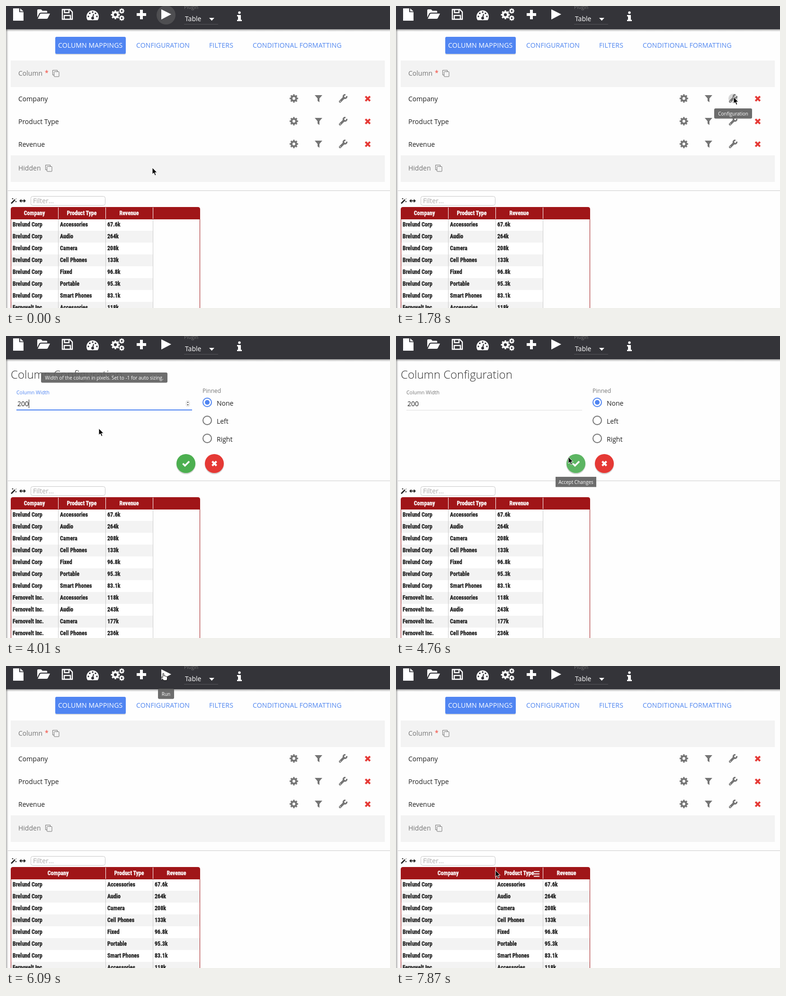
Write an HTML page that moves like this. It is 811 px wide and 637 px high and loops after 8000 ms.

```html
<!DOCTYPE html>
<html lang="en">
<head>
<meta charset="utf-8">
<title>Column width</title>
<style>
html, body { margin: 0; width: 100%; height: 100%; overflow: hidden; background: #fefefe; }
svg { display: block; width: 811px; height: 637px; }
text { font: 14px "Open Sans", sans-serif; fill: #212121; white-space: pre; }
.grey { fill: #757575; }
.white { fill: #fff; }
.star { fill: #f44336; }
.tab { letter-spacing: .01em; fill: #4f86f0; }
.tab.on { fill: #fff; }
.title { font-size: 24px; font-weight: 300; fill: #333; }
.label { font-size: 10.5px; fill: #757575; }
.label.active { fill: #5085f2; }
.pinned { font-size: 12px; fill: #757575; }
.hint { fill: #aaa; }
.tip { font-size: 10px; fill: #fff; text-anchor: middle; }
.cell, .head { font: 900 12px "Roboto Condensed", "Open Sans Condensed", Roboto, sans-serif;
  font-stretch: 75%; stroke: #212121; stroke-width: .3; }
.head { fill: #fff; stroke: #fff; text-anchor: middle; }
</style>
</head>
<body>
<svg id="stage" viewBox="0 0 811 637"></svg>
<script>
const BLUE = '#5085f2', RED = '#e53935', GREY = '#757575', MAROON = '#a01518';

const text = (x, y, s, cls = '', rest = '') => `<text x="${x}" y="${y}" class="${cls}" ${rest}>${s}</text>`;
const rect = (x, y, w, h, fill, rest = '') => `<rect x="${x}" y="${y}" width="${w}" height="${h}" fill="${fill}" ${rest}/>`;
const circle = (x, y, r, fill, rest = '') => `<circle cx="${x}" cy="${y}" r="${r}" fill="${fill}" ${rest}/>`;
const path = (d, fill, rest = '') => `<path d="${d}" fill="${fill}" ${rest}/>`;
const line = (d, color, width = 1, rest = '') => path(d, 'none', `stroke="${color}" stroke-width="${width}" ${rest}`);
const group = (id, ...parts) => `<g id="${id}">${parts.join('')}</g>`;

const tip = (id, x, y, w, label, r = 3) => group(id,
  rect(x, y, w, 21.5, '#616161', `rx="${r}" opacity=".92"`), text(x + w / 2, y + 14.5, label, 'tip'));

const gear = (x, y, r, color) =>
  circle(x, y, r * .56, 'none', `stroke="${color}" stroke-width="${r * .46}"`) +
  circle(x, y, r * .86, 'none', `stroke="${color}" stroke-width="${r * .28}" pathLength="16" stroke-dasharray="1" stroke-dashoffset=".5"`);

const copyIcon = (x, y) =>
  line(`M${x + 3.5} ${y + 10.5}h-3v-10h10v3`, GREY) +
  rect(x + 3.5, y + 3.5, 10.5, 10.5, 'none', `stroke="${GREY}" rx="1"`);

const cross = (x, y, r, color, width) =>
  line(`M${x - r} ${y - r}l${2 * r} ${2 * r}m0 ${-2 * r}l${-2 * r} ${2 * r}`, color, width);

const header = () => [
  rect(0, 49, 5, 588, 'url(#side)'),
  rect(0, 49, 811, 5, 'url(#drop)'),
  rect(0, 0, 811, 49, '#343439'),
  path('M15 5H28V13H37V31H15ZM30 5L37 11.5H30Z', '#fff'),
  path('M66 24V9Q66 7 68 7H74L77 10H85Q87 10 87 12V14H74Q71 14 70 16ZM67 27L72 17Q73 16 74 16H93L88 26Q87 27 86 27Z', '#fff'),
  line('M119 7.5H135L140 12.5V28H119ZM123.5 7.5V14H133V7.5M123 28V20H136V28', '#fff', 2.4),
  path('M172.5 30A13 13 0 1 1 193.5 30Z', '#fff'),
  ...[[174, 22], [177, 15.5], [183, 13], [189, 15.5], [192, 22]].map(([x, y]) => circle(x, y, 1.7, '#343439')),
  line('M183 25L185 17', '#343439', 2), circle(183, 25.5, 3, '#343439'),
  gear(231, 18.5, 9.5, '#fff'), gear(244.5, 10.5, 5.8, '#fff'), gear(244.5, 25.5, 5.8, '#fff'),
  line('M276 18H296M286 8V28', '#fff', 6),
  group('runFocus', circle(338, 19, 20, '#4e4e51')),
  path('M328 7L349 17.5L328 28.5Z', '#fff'),
  text(376, 6, 'Plugin', 'label'), text(378, 32, 'Table', 'white'),
  path('M429 25H440L434.5 31Z', '#fff'), line('M376 38.5H448', '#56565a'),
  circle(493, 14, 2.7, '#fff'), path('M488 19H496V29H498V32H488V29H490V22H488Z', '#fff')
].join('');

const mappingRow = (label, y) => [
  text(26, y + 6, label), gear(608, y, 9, GREY),
  path(`M652 ${y - 7}h16l-6 7v8l-4 -3v-5z`, GREY),
  line(`M705.5 ${y + 6.5}L713.5 ${y - 1.5}`, GREY, 4.8, 'stroke-linecap="round"'),
  line(`M716.9 ${y - 7.5}A3.6 3.6 0 1 0 719.5 ${y - 4.9}`, GREY, 3.2),
  circle(706, y + 6, .9, '#fff'),
  cross(764, y + .5, 4.8, RED, 4)
].join('');

const mappings = () => group('mappings',
  rect(104, 66, 149, 37, '#000', 'rx="3" opacity=".12"'),
  rect(104, 65, 149, 36, BLUE, 'rx="3"'),
  text(110, 88, 'COLUMN MAPPINGS', 'tab on'), text(275, 88, 'CONFIGURATION', 'tab'),
  text(429, 88, 'FILTERS', 'tab'), text(521, 88, 'CONDITIONAL FORMATTING', 'tab'),
  rect(10, 115, 790, 56, '#f3f3f3'), rect(10, 315, 790, 56, '#f3f3f3'),
  text(26, 147, 'Column', 'grey'), text(82, 146, '*', 'star'), copyIcon(98, 135),
  text(26, 347, 'Hidden', 'grey'), copyIcon(83, 335),
  group('wrenchHover', circle(712, 195, 10, '#d8d8d8')),
  ...['Company', 'Product Type', 'Revenue'].map((s, i) => mappingRow(s, 195 + 48 * i)));

const radio = (label, y, on) =>
  circle(425, y, 9, 'none', `stroke="${on ? BLUE : GREY}" stroke-width="2"`) +
  (on ? circle(425, y, 5, BLUE) : '') + text(445, y + 7, label);

const roundButton = (id, x, color) =>
  circle(x, 271, 20.5, '#000', 'opacity=".16"') + circle(x, 269, 20, color, `id="${id}"`);

const dialog = () => group('dialog',
  text(10, 90, 'Column Configuration', 'title'),
  text(22, 123, 'Column Width', 'label', 'id="fieldLabel"'),
  line('M22 156.5H393', '#dedede'),
  group('selection', rect(24, 135, 12, 16, '#b3d4fd')),
  text(24, 148, '', '', 'id="value"'),
  group('focus', rect(22, 155, 371, 2, BLUE),
    rect(380.5, 136.5, 7, 12, '#fff', 'stroke="#ccc" rx="3"'),
    path('M382 141l2 -3l2 3zM382 144l2 3l2 -3z', '#555')),
  rect(0, 134, 1, 18, '#212121', 'id="caret"'),
  text(415, 120, 'Pinned', 'pinned'),
  radio('None', 140, true), radio('Left', 178), radio('Right', 216),
  roundButton('accept', 380, '#4caf50'), line('M373.5 269L378 273.5L387 264.5', '#fff', 3.6),
  roundButton('cancel', 440, RED), cross(440, 269, 4.5, '#fff', 4));

const products = ['Accessories', 'Audio', 'Camera', 'Cell Phones', 'Fixed', 'Portable', 'Smart Phones'];
const revenues = ['67.6k', '264k', '208k', '133k', '96.8k', '95.3k', '83.1k', '118k', '243k', '177k', '236k'];

// edges: x of the four column boundaries
function table(id, edges) {
  const [left, , , right] = edges;
  const rows = revenues.map((revenue, i) => {
    const y = 449 + 25 * i;
    const cells = [i < 7 ? 'Brelund Corp' : 'Fernovelt Inc.', products[i % 7], revenue];
    return rect(left, y, right - left, 25, i % 2 ? '#f3f3f3' : '#fff') +
      line(`M${left} ${y + 25.5}H${right}`, '#ccc') +
      cells.map((s, c) => text(edges[c] + 4, y + 16, s, 'cell')).join('');
  });
  const heads = ['Company', 'Product Type', 'Revenue'].map((s, c) =>
    text((edges[c] + edges[c + 1]) / 2, 441, s, 'head'));
  const dividers = edges.slice(1).filter(x => x < 410);
  return group(id, ...rows,
    ...dividers.map(x => line(`M${x + .5} 450V730`, '#ccc')),
    path('M10 450V429Q10 424 15 424H405Q410 424 410 429V450Z', MAROON),
    ...dividers.map(x => line(`M${x + .5} 425V449`, '#fff')), ...heads);
}

const results = () => group('results',
  line('M4 389.5H811', '#ccc'),
  line('M11 416.5L19 408.5', '#222', 2.6), line('M20.5 407.5l1.5 -1.5M14 405v3M12.5 406.5h3M21 411v3M19.5 412.5h3', '#222'),
  line('M30 411H40', '#222', 1.8), path('M28 411l4.5 -4v8zM42 411l-4.5 -4v8z', '#222'),
  rect(52.5, 401.5, 157, 19, '#fff', 'stroke="#c8c8c8" rx="4"'), text(57, 416, 'Filter...', 'hint'),
  table('narrow', [10, 110, 210, 310]), table('wide', [10, 210, 310, 410]),
  group('rowHover', rect(11, 450, 398, 24, '#000', 'opacity=".07"')),
  group('menu', line('M291 433.5h12m0 5h-12m0 5h12', '#fff', 2)),
  line('M10.5 449V730M409.5 449V730', MAROON));

const pointer = () => group('cursor',
  group('arrow', path('M0 0V14L3.2 11L5.6 16.5L8 15.4L5.7 10.2H10Z', '#000', 'stroke="#fff"')),
  group('hand', path('M-1 1.5C-1 0 1.5 0 1.5 1.5V6C3 5 4 5.5 4.2 6.5C5.5 6 6.3 6.5 6.5 7.5C8 7 8.7 8 8.7 9V12L7.5 15.5H1C0 13.5-3.5 10.5-4.2 9.5C-5 8-3 7.3-1 9.5Z', '#fff', 'stroke="#000"')),
  group('beam', line('M-2.5 -7.5Q0 -7.5 0 -5.5Q0 -7.5 2.5 -7.5M0 -6V7M-2.5 8.5Q0 8.5 0 6.5Q0 8.5 2.5 8.5', '#000')));

const defs = `<defs>
  <linearGradient id="drop" x2="0" y2="1"><stop stop-opacity=".35"/><stop offset="1" stop-opacity="0"/></linearGradient>
  <linearGradient id="side"><stop stop-opacity=".3"/><stop offset="1" stop-opacity="0"/></linearGradient>
</defs>`;

document.getElementById('stage').innerHTML = [
  defs, results(), mappings(), dialog(), header(),
  tip('tipConfig', 672, 216, 80, 'Configuration'),
  tip('tipWidth', 74, 77, 267, 'Width of the column in pixels. Set to -1 for auto sizing.'),
  tip('tipAccept', 337, 297, 86, 'Accept Changes', 0),
  tip('tipRun', 321, 48, 34, 'Run'),
  pointer()
].join('');

// pointer moves: first step, last step, number of steps, end position
const moves = [
  [290, 440, 2, 320, 347], [590, 1190, 5, 690, 219], [1340, 1640, 3, 713, 192],
  [2080, 2380, 3, 243, 178], [2520, 2820, 3, 10, 142], [2970, 2970, 1, 30, 142],
  [4010, 4010, 1, 196, 195], [4160, 4610, 4, 364, 255], [5060, 5800, 6, 332, 15],
  [6840, 7580, 6, 240, 454], [7720, 7870, 2, 210, 431]
];

function pointerAt(t) {
  let x = 309, y = 341;
  for (const [start, end, steps, toX, toY] of moves) {
    if (t < start) break;
    const step = end > start ? 1 + Math.floor((t - start) / (end - start) * (steps - 1) + .05) : steps;
    const p = Math.min(1, step / steps), eased = p * p * (3 - 2 * p);
    x += (toX - x) * eased;
    y += (toY - y) * eased;
  }
  return { x: Math.round(x), y: Math.round(y) };
}

const el = id => document.getElementById(id);
const show = (id, on) => { el(id).style.display = on ? '' : 'none'; };

function render(t) {
  const within = (a, b) => t >= a && t < b;
  const { x, y } = pointerAt(t);
  const config = within(1930, 4910), focused = within(2670, 4760);
  const value = t < 3420 ? '-1' : '200'.slice(0, t < 3570 ? 1 : t < 3720 ? 2 : 3);

  show('mappings', !config);
  show('dialog', config);
  el('results').setAttribute('transform', `translate(0 ${config ? -84 : 0})`);
  show('narrow', t < 6090);
  show('wide', t >= 6090);
  show('runFocus', t < 1780);
  show('wrenchHover', within(1640, 1930));

  show('focus', focused);
  show('selection', within(2820, 3420));
  show('caret', within(3420, 4760));
  el('caret').setAttribute('x', 24 + 8 * value.length);
  el('value').textContent = value;
  el('fieldLabel').classList.toggle('active', focused);
  el('accept').setAttribute('fill', within(4610, 4910) ? '#5cb562' : '#4caf50');

  show('tipConfig', within(1780, 1930));
  show('tipWidth', within(3420, 4160));
  show('tipAccept', within(4760, 4910));
  show('tipRun', within(5950, 6840));
  show('menu', !config && x >= 210 && x < 310 && y > 424 && y < 449);
  show('rowHover', !config && x < 410 && y >= 450 && y < 475);

  const hand = y < 38, beam = within(2970, 3420);
  show('cursor', !within(3420, 4010));
  show('arrow', !hand && !beam);
  show('hand', hand);
  show('beam', beam);
  el('cursor').setAttribute('transform', `translate(${x} ${y})`);
}

const begin = performance.now();
function tick() {
  render((performance.now() - begin) % 8000);
  requestAnimationFrame(tick);
}
tick();
</script>
</body>
</html>
```
